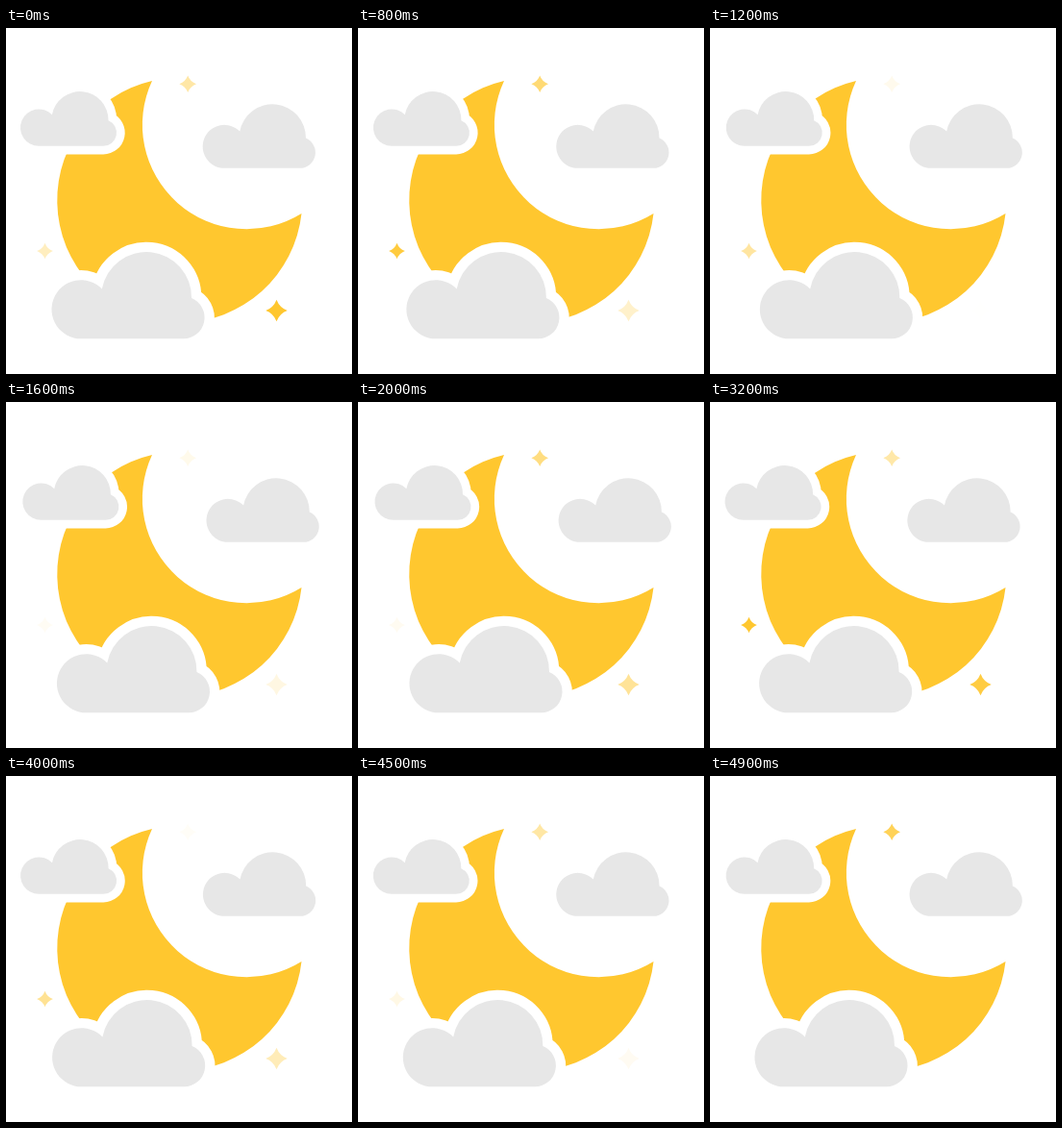
Recreate the animation shown at these times as an HTML page. Size 360 by 360 pixels, loop 5000 ms.

```html
<!DOCTYPE html>
<html lang="en">
<head>
<meta charset="utf-8">
<title>Moon and clouds</title>
<style>
  html, body { margin: 0; width: 100%; height: 100%; overflow: hidden; background: #fff; }
  svg { display: block; width: 100%; height: 100%; }
  .gold { fill: #ffc72f; }
  .cloud { fill: #e7e7e7; stroke: #fff; stroke-linejoin: round; paint-order: stroke; }
</style>
</head>
<body>
<svg viewBox="0 0 360 360">
  <defs>
    <path id="puff" d="M30.5 0A30.5 30.5 0 1 1 52.3 -51.8A47 47 0 0 1 145.5 -42.3A22 22 0 0 1 137 0Z"/>
    <path id="spark" d="M0 -11Q3 -3 11 0Q3 3 0 11Q-3 3 -11 0Q-3 -3 0 -11Z"/>
  </defs>
  <path class="gold" d="M152 55A127.5 127.5 0 1 0 307.5 193A108.5 108.5 0 0 1 152 55Z"/>
  <g class="gold">
    <use id="starTop" href="#spark" transform="translate(189.2 58.3) scale(.8)"/>
    <use id="starLeft" href="#spark" transform="translate(40.5 232) scale(.76)"/>
    <use id="starRight" href="#spark" transform="translate(281.5 294) scale(1.02)"/>
  </g>
  <g id="cloudLeft">
    <use class="cloud" href="#puff" stroke-width="27.5" transform="translate(15 122.8) scale(.629)"/>
  </g>
  <g id="cloudRight">
    <use class="cloud" href="#puff" stroke-width="0" transform="translate(204.7 145.8) scale(.737)"/>
  </g>
  <g id="cloudFront">
    <use class="cloud" href="#puff" stroke-width="20.6" transform="translate(48 323.3)"/>
  </g>
</svg>
<script>
  const LOOP = 5000, STEP = 100, SLOWING = 4630;
  const el = id => document.getElementById(id);
  const wave = turns => (1 + Math.cos(2 * Math.PI * turns)) / 2;

  // Clouds sway sideways, furthest right at the peak time
  function sway(id, t, from, range, peak, period) {
    const x = from + range * wave((t - peak) / period);
    el(id).setAttribute("transform", `translate(${x} 0)`);
  }

  // Stars twinkle more and more slowly, brightest at the peak time
  function twinkle(id, t, peak, rate) {
    const turns = rate * Math.log((t + SLOWING) / (peak + SLOWING));
    el(id).setAttribute("opacity", wave(turns));
  }

  function draw(now) {
    const t = Math.floor((now % LOOP) / STEP) * STEP;
    sway("cloudLeft", t, 0, 2.5, 1900, 3750);
    sway("cloudRight", t, 0, 4, 1850, 3700);
    sway("cloudFront", t, -1.5, 7, 2100, 5600);
    twinkle("starTop", t, 2500, 2.95);
    twinkle("starLeft", t, 3200, 2.5);
    twinkle("starRight", t, 0, 2.09);
  }

  let start;
  function tick(now) {
    start ??= now;
    draw(Math.max(0, now - start));
    requestAnimationFrame(tick);
  }
  draw(0);
  requestAnimationFrame(tick);
</script>
</body>
</html>
```
